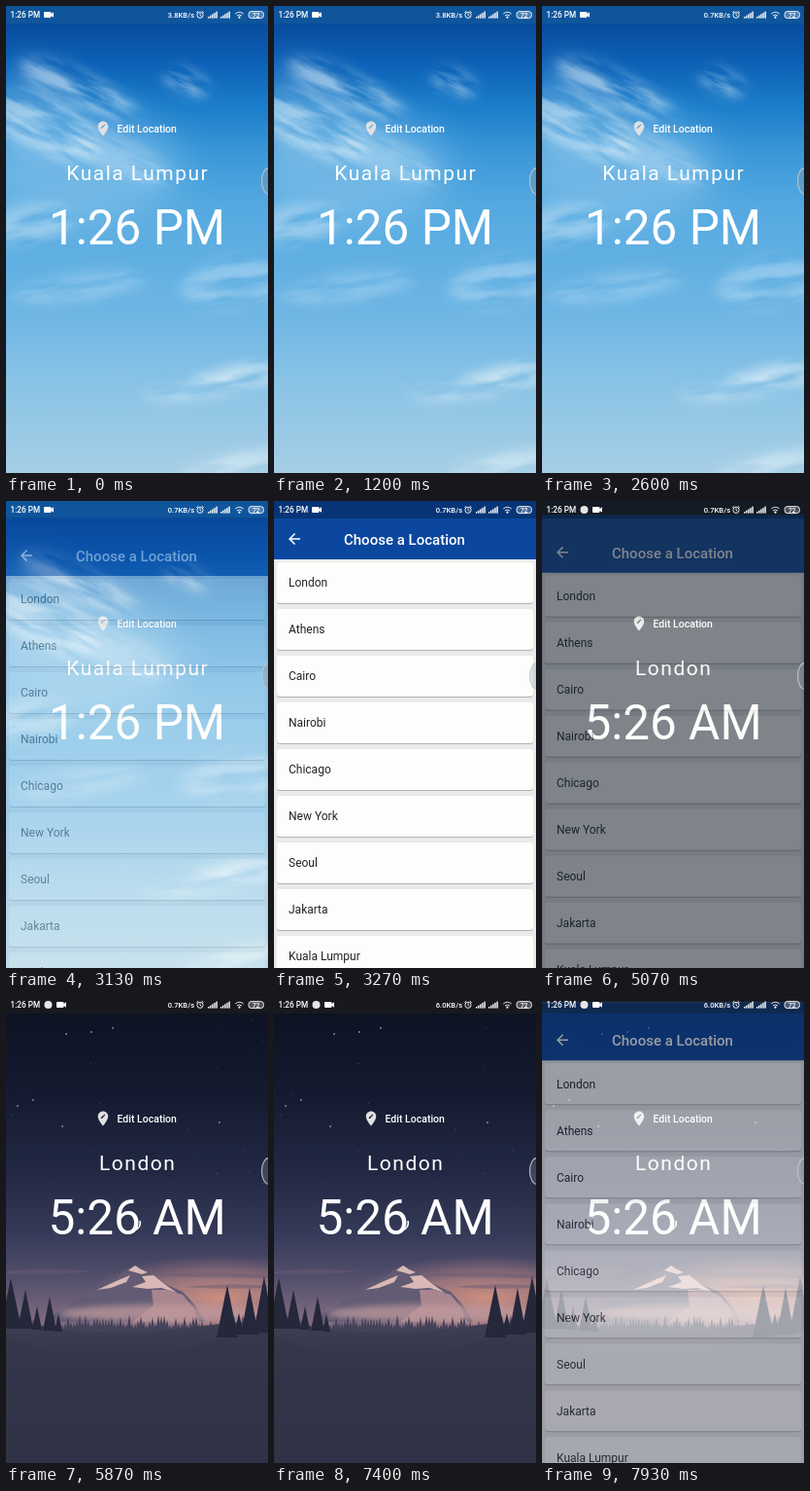
Animation of 270 by 480 pixels, one loop 8 s. Source, as an HTML page:

```html
<!DOCTYPE html>
<html lang="en">
<head>
<meta charset="utf-8">
<title>World clock</title>
<style>
  html, body { margin: 0; width: 100%; height: 100%; overflow: hidden; background: #0c1620; }
  svg { display: block; width: 270px; height: 480px; }
  text { font-family: Roboto, Arial, sans-serif; fill: #fff; }
  .edit { font-size: 10.5px; font-weight: 500; }
  .city { font-size: 21px; letter-spacing: 1.5px; text-anchor: middle; }
  .time { font-size: 49.5px; text-anchor: middle; }
  .title { font-size: 15px; font-weight: 500; }
  .item { font-size: 12px; fill: #212326; }
  .bar { font-size: 8.2px; font-weight: 500; }
  .off { visibility: hidden; }
</style>
</head>
<body>
<svg viewBox="0 0 270 480">
  <defs>
    <linearGradient id="daySky" x2="0" y2="1">
      <stop offset=".03" stop-color="#084a9c"/>
      <stop offset=".12" stop-color="#0c60b6"/>
      <stop offset=".22" stop-color="#1c7fcb"/>
      <stop offset=".32" stop-color="#3c98d8"/>
      <stop offset=".43" stop-color="#55a9e0"/>
      <stop offset=".55" stop-color="#61b0e3"/>
      <stop offset=".66" stop-color="#6eb6e4"/>
      <stop offset=".82" stop-color="#8cc4e6"/>
      <stop offset="1" stop-color="#a5cee5"/>
    </linearGradient>
    <linearGradient id="nightSky" gradientUnits="userSpaceOnUse" x1="0" y1="0" x2="0" y2="335">
      <stop offset=".05" stop-color="#0d1323"/>
      <stop offset=".3" stop-color="#141b30"/>
      <stop offset=".55" stop-color="#232944"/>
      <stop offset=".73" stop-color="#353a58"/>
      <stop offset=".86" stop-color="#514e6b"/>
      <stop offset="1" stop-color="#806c80"/>
    </linearGradient>
    <radialGradient id="glow">
      <stop offset="0" stop-color="#d8937f" stop-opacity=".9"/>
      <stop offset=".5" stop-color="#c28a86" stop-opacity=".6"/>
      <stop offset="1" stop-color="#b07a80" stop-opacity="0"/>
    </radialGradient>
    <linearGradient id="ground" x2="0" y2="1">
      <stop offset="0" stop-color="#403f54"/>
      <stop offset=".35" stop-color="#313348"/>
      <stop offset="1" stop-color="#2a2c41"/>
    </linearGradient>
    <filter id="wisp" filterUnits="userSpaceOnUse" x="-200" y="-150" width="700" height="800">
      <feGaussianBlur in="SourceGraphic" stdDeviation="7" result="mass"/>
      <feTurbulence type="fractalNoise" baseFrequency=".014 .07" numOctaves="4" seed="7"/>
      <feColorMatrix values="0 0 0 0 1  0 0 0 0 1  0 0 0 0 1  3.2 0 0 0 -.95"/>
      <feComposite in="mass" operator="in"/>
      <feComposite in="mass" operator="arithmetic" k2="0" k3="1"/>
    </filter>
    <filter id="haze" x="-50%" y="-50%" width="200%" height="200%"><feGaussianBlur stdDeviation="20"/></filter>
    <filter id="soft" x="-20%" y="-100%" width="140%" height="300%"><feGaussianBlur stdDeviation="3"/></filter>
  </defs>

  <g id="day">
    <path fill="url(#daySky)" d="M0 0h270v480H0z"/>
    <ellipse cx="75" cy="165" rx="105" ry="55" fill="#a9d8f4" opacity=".42" filter="url(#haze)"/>
    <ellipse cx="25" cy="105" rx="40" ry="40" fill="#a9d8f4" opacity=".3" filter="url(#haze)"/>
    <g fill="#e6f3fb" filter="url(#wisp)" transform="rotate(24)" id="high"></g>
    <g fill="#e6f3fb" filter="url(#wisp)" transform="rotate(-9)" id="low"></g>
    <path fill="#1572d0" d="M0 0h270v18H0z"/>
  </g>
  <g id="night">
    <path fill="url(#nightSky)" d="M0 0h270v480H0z"/>
    <ellipse cx="220" cy="310" rx="140" ry="44" fill="url(#glow)"/>
    <g fill="#6b5a73" opacity=".5">
      <path d="M0 283q40-5 90 0q-40 4-90 3zM150 287q60-6 120 0v3q-70 0-120-3zM185 299q50-5 85-1v2q-50 2-85-1z"/>
    </g>
    <g id="stars" fill="#c9d3e6"></g>
    <path d="M138 231q2 7-6 10" fill="none" stroke="#fff" stroke-width="1.6"/>
    <path fill="#625b73" d="M48 328L82 307 104 296 120 284 133 277 142 282 152 287 166 297 182 304 196 319 205 335H48z"/>
    <path fill="#d9b8b6" d="M126 282L133 277 139 281 146 284 140 286zM140 288L152 287 166 298 176 305 160 300 146 301 130 299 144 294zM118 291L128 287 124 294 108 300 94 302z"/>
    <path fill="#a9858f" d="M150 302L165 302 182 307 193 320 199 335H130L152 318z"/>
    <ellipse cx="165" cy="326" rx="110" ry="9" fill="#c09a9c" opacity=".75" filter="url(#soft)"/>
    <path id="forest" fill="#444259"/>
    <path fill="url(#ground)" d="M0 334Q35 338 65 344Q140 348 190 341Q240 333 270 336V480H0z"/>
    <path fill="#35364b" d="M270 343Q215 350 165 371Q110 384 60 372L0 348V480H270z" opacity=".65"/>
    <path id="pines" fill="#25273a"/>
    <path fill="#20222a" d="M0 0h270v18H0z"/>
  </g>
  <g id="blank">
    <path fill="#1b2431" d="M0 0h270v480H0z"/>
  </g>

  <path fill="#e0e0e0" transform="translate(91 117) scale(.75)" d="M12 2C8.14 2 5 5.14 5 9c0 5.25 7 13 7 13s7-7.75 7-13c0-3.86-3.14-7-7-7zm-1.56 10H9v-1.44l3.35-3.34 1.43 1.43L10.44 12zm4.45-4.45l-.7.7-1.44-1.44.7-.7c.15-.15.39-.15.54 0l.9.9c.15.15.15.39 0 .54z"/>
  <text class="edit" x="114.5" y="130">Edit Location</text>
  <text class="city" id="city" x="135.7" y="179"></text>
  <text class="time" id="time" x="135" y="245"></text>

  <g id="list">
    <path fill="#e9eae9" d="M0 0h270v480H0z"/>
    <path fill="#0b479f" d="M0 0h270v60H0z"/>
    <path fill="#fff" transform="translate(12 30) scale(.75)" d="M20 11H7.83l5.59-5.59L12 4l-8 8 8 8 1.41-1.41L7.83 13H20v-2z"/>
    <text class="title" x="72" y="44.8">Choose a Location</text>
  </g>

  <path d="M0 0h270v18H0z" opacity=".25"/>
  <text class="bar" x="4.5" y="11.8">1:26 PM</text>
  <circle id="notice" cx="43.5" cy="9" r="4" fill="#e6e6e6"/>
  <path id="camera" fill="#fff" d="M40 6h5.5q1 0 1 1v1l2.5-1.7v5.4l-2.5-1.7v1q0 1-1 1H40q-1 0-1-1V7q0-1 1-1z"/>
  <text class="bar" id="speed" x="166.8" y="11.8" style="font-size:7.6px"></text>
  <g fill="none" stroke="#fff" stroke-width=".9">
    <circle cx="200" cy="9.3" r="3.1"/>
    <path d="M200 7.3v2.2l1.4.8M196.3 6.8l1.9-1.6M203.7 6.8l-1.9-1.6"/>
    <path d="M236.3 8q4.2-3.5 8.4 0M238 10q2.5-2 5 0"/>
    <rect x="250" y="5.6" width="15.5" height="7" rx="3" fill="#fff" fill-opacity=".25"/>
  </g>
  <circle cx="240.5" cy="11.7" r="1.1" fill="#fff"/>
  <text x="257.8" y="11.5" font-size="6.6" font-weight="500" text-anchor="middle">72</text>
  <g id="signal" fill="#fff"></g>
  <ellipse cx="271" cy="180" rx="7.5" ry="13.5" fill="#8c959c" fill-opacity=".28" stroke="#c3c9cd" stroke-opacity=".8" stroke-width="1.3"/>
</svg>
<script>
const LOOP = 8000, FPS = 15;
const $ = id => document.getElementById(id);

function add(parent, tag, attrs, text) {
  const el = document.createElementNS('http://www.w3.org/2000/svg', tag);
  for (const key in attrs) el.setAttribute(key, attrs[key]);
  if (text) el.textContent = text;
  return parent.appendChild(el);
}

function random(seed) {
  return () => (seed = seed * 16807 % 2147483647) / 2147483647;
}

// Cloud masses at stage positions: x, y, rx, ry, opacity; the layer's tilt sets the streak direction
function clouds(id, tilt, masses) {
  const a = tilt * Math.PI / 180, cos = Math.cos(a), sin = Math.sin(a);
  for (const [x, y, rx, ry, opacity] of masses) {
    add($(id), 'ellipse', { cx: x * cos + y * sin, cy: y * cos - x * sin, rx, ry, opacity });
  }
}
clouds('high', 24, [
  [75, 85, 65, 16, .55], [40, 125, 60, 28, .5], [105, 150, 70, 20, .3], [186, 78, 22, 10, .85]
]);
clouds('low', -9, [
  [20, 225, 50, 20, .4], [75, 290, 70, 14, .28], [235, 285, 55, 24, .34],
  [215, 388, 75, 11, .6], [245, 380, 30, 12, .4], [235, 470, 55, 9, .6]
]);

// Stars
const rnd = random(41);
[[62, 39], [88, 37], [110, 33], [220, 130], [12, 113], [58, 134], [28, 107]]
  .forEach(([cx, cy]) => add($('stars'), 'circle', { cx, cy, r: .8 }));
for (let i = 0; i < 28; i++) {
  add($('stars'), 'circle', { cx: rnd() * 270, cy: 22 + rnd() * 190, r: .45, opacity: .25 + rnd() * .4 });
}

// Trees
const tree = (x, base, h, w) => `M${x} ${base - h}L${x + w} ${base}H${x - w}z`;
let forest = '';
for (let x = 10; x < 265; x += 3) forest += tree(x, 348, 10 + rnd() * 11, 3.2);
$('forest').setAttribute('d', forest);
$('pines').setAttribute('d', [
  [5, 342, 52, 11], [20, 342, 40, 8], [32, 343, 24, 5], [45, 344, 35, 7], [54, 345, 18, 4],
  [228, 351, 54, 11], [251, 348, 48, 9], [266, 346, 58, 11], [240, 348, 22, 5]
].map(p => tree(...p)).join(''));

// Location cards
['London', 'Athens', 'Cairo', 'Nairobi', 'Chicago', 'New York', 'Seoul', 'Jakarta', 'Kuala Lumpur']
  .forEach((name, i) => {
    const y = 63 + i * 48, box = { x: 3, width: 264, height: 42, rx: 3 };
    add($('list'), 'rect', { ...box, y: y + 1, opacity: .24 });
    add($('list'), 'rect', { ...box, y, fill: '#fcfefb' });
    add($('list'), 'text', { class: 'item', x: 15, y: y + 25.3 }, name);
  });

// Signal bars
for (const x0 of [208, 221]) {
  for (let i = 0; i < 5; i++) {
    const height = 1.6 + i * 1.35;
    add($('signal'), 'rect', { x: x0 + i * 2.1, y: 12.6 - height, width: 1.4, height });
  }
}

// The list page fades in while rising, and leaves the same way reversed
function pageTrack(prop, hidden, shown, enter, leave) {
  const steps = [
    [0, hidden], [2960, hidden, enter], [3260, shown],
    [4950, shown, leave], [5250, hidden], [7717, hidden, enter], [8017, shown]
  ];
  const end = steps[steps.length - 1][0];
  const frames = steps.map(([ms, value, easing = 'linear']) => ({ offset: ms / end, [prop]: value, easing }));
  const anim = $('list').animate(frames, { duration: end, fill: 'both' });
  anim.pause();
  return anim;
}
const tracks = [
  pageTrack('opacity', 0, 1, 'cubic-bezier(.42,0,1,1)', 'cubic-bezier(0,0,.58,1)'),
  pageTrack('transform', 'translateY(120px)', 'translateY(0px)', 'cubic-bezier(.4,0,.2,1)', 'cubic-bezier(.8,0,.6,1)')
];

const show = (id, on) => $(id).classList.toggle('off', !on);
function setText(id, text) {
  if ($(id).textContent !== text) $(id).textContent = text;
}

function draw(t) {
  const london = t >= 4000, loaded = t >= 5860, notified = t >= 4860;
  tracks.forEach(a => a.currentTime = t);
  show('day', !london);
  show('night', loaded);
  show('blank', london && !loaded);
  setText('city', london ? 'London' : 'Kuala Lumpur');
  setText('time', london ? '5:26 AM' : '1:26 PM');
  setText('speed', t < 2200 ? '3.8KB/s' : t < 6200 ? '0.7KB/s' : '6.0KB/s');
  show('notice', notified);
  $('camera').setAttribute('transform', `translate(${notified ? 13 : 0} 0)`);
}

const start = performance.now();
function tick() {
  const t = (performance.now() - start) % LOOP;
  draw(Math.min(Math.floor((t + 5) * FPS / 1000) * 1000 / FPS, LOOP - 1));
  requestAnimationFrame(tick);
}
tick();
</script>
</body>
</html>
```
